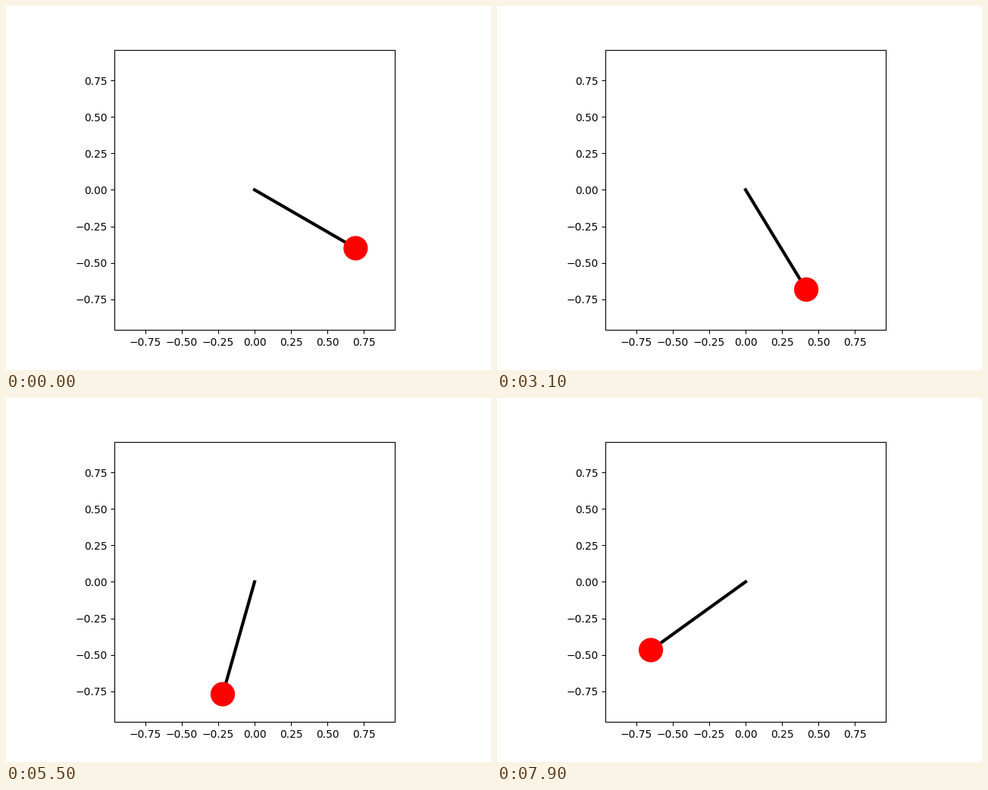
A matplotlib script for the animation above (8 s loop, 640x480 px).

```python
import numpy as np
import matplotlib.pyplot as plt
from matplotlib.animation import FuncAnimation

LENGTH, GRAVITY = 0.8, 9.81
THETA0 = np.radians(60)
DT = 0.01
FRAMES, INTERVAL = 80, 100
BOB_RADIUS = 0.08


def swing(steps):
    """Angles of a frictionless pendulum, forward Euler from rest."""
    theta, omega = THETA0, 0.0
    angles = [theta]
    for _ in range(steps):
        acc = -GRAVITY / LENGTH * np.sin(theta)
        theta += omega * DT
        omega += acc * DT
        angles.append(theta)
    return angles


def bob_position(theta):
    return LENGTH * np.sin(theta), -LENGTH * np.cos(theta)


angles = swing(FRAMES)

fig, ax = plt.subplots(figsize=(6.4, 4.8), dpi=100)
limit = LENGTH * 1.2
ax.set_xlim(-limit, limit)
ax.set_ylim(-limit, limit)
ax.set_aspect("equal")

x0, y0 = bob_position(THETA0)
rod, = ax.plot([0, x0], [0, y0], lw=3, c="k")
bob = ax.add_patch(plt.Circle((x0, y0), BOB_RADIUS, fc="r", ec="r", zorder=3))


def animate(i):
    x, y = bob_position(angles[i + 1])  # the swing is shown from its first step
    rod.set_data([0, x], [0, y])
    bob.set_center((x, y))
    return rod, bob


ani = FuncAnimation(fig, animate, frames=FRAMES, interval=INTERVAL,
                    repeat=True, repeat_delay=0)
plt.show()
```
